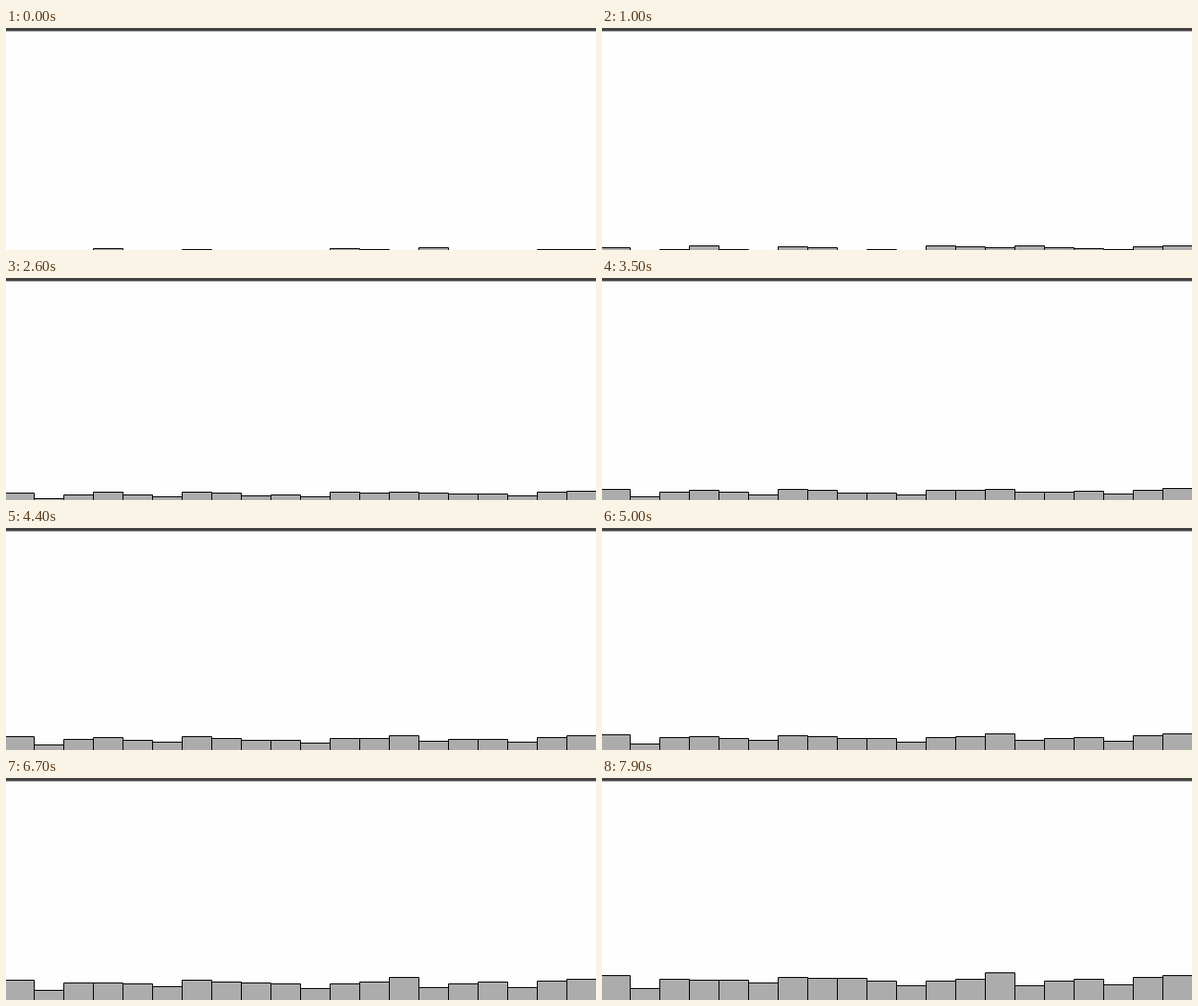
An HTML page with a canvas that plays this animation: 638 px wide and 241 px high, repeating every 8 s.

```html
<!DOCTYPE html>
<html lang="en">
<head>
<meta charset="utf-8">
<title>Random counts</title>
<style>
html, body { margin: 0; width: 100%; height: 100%; overflow: hidden; background: #fefefe; }
canvas { display: block; }
</style>
</head>
<body>
<canvas id="stage" width="638" height="241"></canvas>
<script>
const ctx = document.getElementById('stage').getContext('2d');
const W = 638, H = 241, LOOP = 8000, TICK = 100, LAST = LOOP / TICK - 1;
const PITCH = 32, LEFT = -2, BASE = 245;

// Count of each bar when the loop starts and when it ends.
const first = [4, 0, 2, 6, 2, 1, 5, 4, 0, 2, 2, 6, 5, 3, 7, 4, 2, 3, 5, 5];
const final = [31, 17, 27, 26, 26, 23, 29, 28, 28, 25, 20, 25, 27, 34, 20, 25, 27, 21, 29, 31];

// Spreads the steps so that the bars do not all climb together.
const phase = i => (0.1 + i * 0.618034) % 1 * 0.98;

function countAt(i, tick) {
  const gain = (final[i] - first[i]) * tick / LAST;
  return first[i] + Math.floor(gain + phase(i));
}

function draw(tick) {
  ctx.fillStyle = '#fefefe';
  ctx.fillRect(0, 0, W, H);
  ctx.fillStyle = '#424242';
  ctx.fillRect(0, 0, W, 3.5);

  ctx.fillStyle = '#acacac';
  ctx.strokeStyle = '#000';
  ctx.lineWidth = 1;
  ctx.lineJoin = 'round';
  for (let i = 0; i < first.length; i++) {
    const x = LEFT + i * PITCH + 0.5;
    const y = BASE - countAt(i, tick) + 0.5;
    ctx.beginPath();
    ctx.rect(x, y, PITCH, H + 10 - y);
    ctx.fill();
    ctx.stroke();
  }
}

function frame(now) {
  draw(Math.floor(now % LOOP / TICK));
  requestAnimationFrame(frame);
}
draw(0);
requestAnimationFrame(frame);
</script>
</body>
</html>
```
